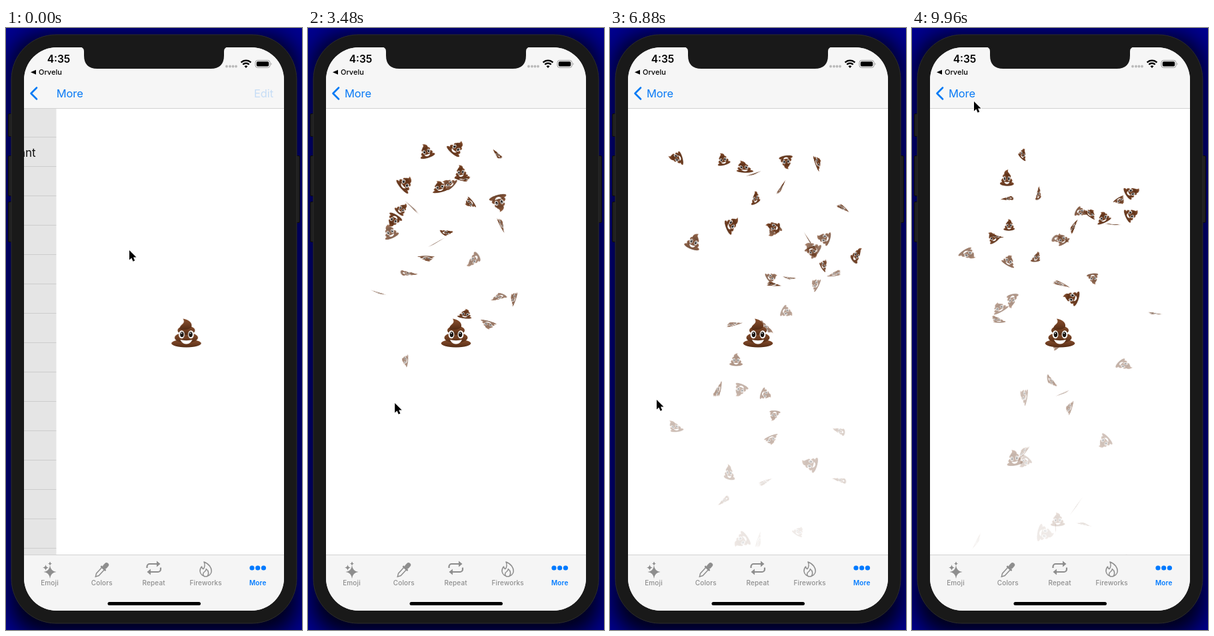
Recreate the animation shown at these times as an HTML page with a canvas. Size 444 px wide and 902 px high, loop 10 s.

```html
<!DOCTYPE html>
<html lang="en">
<head>
<meta charset="utf-8">
<title>Emoji fountain</title>
<style>
  html, body { margin: 0; width: 444px; height: 902px; overflow: hidden; background: #000090; }
  svg, canvas { position: absolute; left: 0; top: 0; display: block; }
  #stage { left: 27px; top: 121px; }
  text { font-family: Inter, Roboto, sans-serif; }
  .nav { font-size: 16.5px; letter-spacing: -.1px; fill: #087af5; }
  .tabs text { font-size: 10px; font-weight: 500; letter-spacing: .15px; text-anchor: middle; }
  .line { fill: none; stroke: #8e8e8e; }
</style>
</head>
<body>
<svg width="444" height="902" viewBox="0 0 444 902">
  <defs>
    <clipPath id="screen"><rect x="27" y="29" width="390" height="844" rx="49"/></clipPath>
    <filter id="blur" x="-20%" y="-10%" width="140%" height="120%"><feGaussianBlur stdDeviation="16"/></filter>
  </defs>
  <rect width="444" height="902" fill="#000090"/>
  <rect x="6" y="10" width="432" height="900" rx="50" opacity=".85" filter="url(#blur)"/>
  <g fill="#1f1f1f" stroke="#0b0b0b">
    <rect x="3.5" y="128.5" width="8" height="34" rx="1.5"/>
    <rect x="3.5" y="191.5" width="8" height="60" rx="1.5"/>
    <rect x="3.5" y="260.5" width="8" height="60" rx="1.5"/>
    <rect x="432.5" y="191.5" width="8" height="100" rx="1.5"/>
  </g>
  <rect x="8" y="10" width="428" height="882" rx="67" fill="#191919" stroke="#2c2c2c"/>

  <g clip-path="url(#screen)">
    <rect x="27" y="29" width="390" height="844" fill="#e5e5e5"/>
    <path id="rows" stroke="#cdcdcd"/>
    <text id="row" y="193" font-size="17" text-anchor="end" fill="#111">Elephant</text>
    <rect id="page" y="120" width="390" height="670" fill="#fff"/>
    <rect x="27" y="29" width="390" height="91" fill="#f6f6f6"/>
    <rect x="27" y="790" width="390" height="83" fill="#f5f5f5"/>
    <path d="M27 120.5H417M27 789.5H417" stroke="#d2d2d2"/>
  </g>
  <path d="M111 28.5Q117 29 117 35V41Q117 61 137 61H307Q327 61 327 41V35Q327 29 333 28.5Z" fill="#191919"/>

  <text x="79" y="52" font-size="15.5" font-weight="600" text-anchor="middle">4:35</text>
  <path d="M37 66.3L45 62.8V69.8Z"/>
  <text x="49" y="70" font-size="11" font-weight="500">Orvelu</text>
  <path d="M331 57.5h.01M336 57.5h.01M340.5 57.5h.01M345 57.5h.01" stroke="#b9b9b9" stroke-width="3.8" stroke-linecap="round"/>
  <path d="M352.6 51.6A10.5 10.5 0 0 1 367.4 51.6M355.3 54.7A6.7 6.7 0 0 1 364.7 54.7" fill="none" stroke="#000" stroke-width="2.3"/>
  <path d="M357.5 57.2Q360 55.2 362.5 57.2L360 60Z"/>
  <rect x="374" y="48.5" width="22" height="10.8" rx="3.3" fill="none" stroke="#999"/>
  <rect x="375.8" y="50.3" width="18.4" height="7.2" rx="1.8"/>
  <path d="M397.5 52Q399.5 53.9 397.5 55.8Z" fill="#999"/>

  <path d="M46 89.5L37.5 98L46 106.5" fill="none" stroke="#087af5" stroke-width="2.6" stroke-linecap="round" stroke-linejoin="round"/>
  <text id="back" class="nav" y="104">More</text>
  <text id="edit" class="nav" x="372" y="104">Edit</text>

  <g class="tabs" fill="#8e8e8e">
    <path d="M66 805Q67 814 75.500 815Q67 816 66 825Q65 816 56.500 815Q65 814 66 805M59.500 804Q60 808 64 808.500Q60 809 59.500 813Q59 809 55 808.500Q59 808 59.500 804M66 799.500Q66.500 802 69 802.500Q66.500 803 66 805.500Q65.500 803 63 802.500Q65.500 802 66 799.500"/>
    <g transform="translate(134 822.5) rotate(43)">
      <path class="line" d="M-2.5-17V-5L0-.5L2.5-5V-17" stroke-width="1.5"/>
      <rect x="-5" y="-19" width="10" height="2.8" rx="1.2"/>
      <rect x="-3.4" y="-28" width="6.8" height="10" rx="3.4"/>
    </g>
    <path class="line" d="M211.5 809V807A4 4 0 0 1 215.5 803H227M232 808.5V811A4 4 0 0 1 228 815H217" stroke-width="2.2"/>
    <path d="M226 798.5L231.5 803L226 807.5ZM217 810.5L211.5 815L217 819.5Z"/>
    <path class="line" d="M297 800C305 803 308.3 809 308.3 814A8.7 8.7 0 0 1 291 814C291 811 292 808.5 293.5 807C294 809 295 810.5 296 810.5C298.5 808 298.5 803 297 800ZM298 822C294.5 820 295 816.5 298 814.5C300 813 300.5 812 300.3 810.5C304 813 305 818.5 301.5 822" stroke-width="1.5" stroke-linejoin="round"/>
    <text x="65.5" y="835">Emoji</text>
    <text x="143.8" y="835">Colors</text>
    <text x="221.6" y="835">Repeat</text>
    <text x="299.7" y="835">Fireworks</text>
    <g fill="#007aff">
      <circle cx="369" cy="809" r="3.6"/><circle cx="377.7" cy="809" r="3.6"/><circle cx="386.4" cy="809" r="3.6"/>
      <text x="377.7" y="835" style="font-weight:600">More</text>
    </g>
  </g>
  <rect x="152.5" y="860" width="139.5" height="5" rx="2.5"/>
</svg>
<canvas id="stage" width="390" height="668"></canvas>
<svg id="cursor" width="16" height="22" viewBox="-2 -2 16 22">
  <path d="M0 0V14.5L3.3 11.5L5.6 16.7L8.2 15.6L6 10.5H10.5Z" stroke="#fff" stroke-width="1.3" paint-order="stroke"/>
</svg>
<script>
const LOOP = 10, START = 1.19, RATE = 11, LIFE = 4.1, GRAVITY = 80, RISE = .45;
const CENTER = { x: 195, y: 336 };
const $ = id => document.getElementById(id);
const ctx = $('stage').getContext('2d');
ctx.imageSmoothingQuality = 'high';

// Cursor stops: seconds, x, y
const stops = [[0, 185, 333], [.25, 185, 333], [1, 127, 562], [2.28, 127, 562], [4.56, 133, 562],
  [6, 147, 565], [6.88, 70, 557], [7.1, 70, 557], [8, 93, 110], [10, 93, 110]];

const random = (n, k) => {
  const v = Math.sin(n * 127.1 + k * 311.7 + 17) * 43758.5453;
  return v - Math.floor(v);
};

function makeSprite() {
  const sprite = document.createElement('canvas');
  sprite.width = sprite.height = 96;
  const g = sprite.getContext('2d');
  g.scale(2, 2);
  g.translate(24, 24);
  const oval = (x, y, rx, ry, fill) => {
    g.beginPath();
    g.ellipse(x, y, rx, ry, 0, 0, 7);
    g.fillStyle = fill;
    g.fill();
  };
  const shade = (top, bottom) => {
    const s = g.createLinearGradient(0, top, 0, bottom);
    s.addColorStop(0, '#88502f');
    s.addColorStop(.5, '#713f22');
    s.addColorStop(1, '#512a13');
    return s;
  };
  oval(0, 15.5, 22.3, 6, shade(9, 22));
  oval(0, 7, 17.5, 7.8, shade(-1, 15));
  oval(0, -4, 13, 6.8, shade(-11, 3));
  g.beginPath();
  g.moveTo(-10, -6);
  g.bezierCurveTo(-10, -14, 0, -13, -5, -21.5);
  g.bezierCurveTo(4, -20, 10, -15, 7.5, -8);
  g.quadraticCurveTo(0, -3, -10, -6);
  g.fillStyle = shade(-22, -4);
  g.fill();
  for (const x of [-7, 7]) {
    oval(x, 2.2, 4.4, 6, '#fff');
    oval(x * .94, 2.2, 2.8, 4.1, '#17120f');
    oval(x * .94 - .5, .4, .8, 1, '#fff');
  }
  g.beginPath();
  g.moveTo(-9, 10);
  g.quadraticCurveTo(0, 12.4, 9, 10);
  g.quadraticCurveTo(6, 16.5, 0, 16.5);
  g.quadraticCurveTo(-6, 16.5, -9, 10);
  g.fillStyle = '#fff';
  g.fill();
  return sprite;
}
const sprite = makeSprite();
const drawSprite = size => ctx.drawImage(sprite, -size / 2, -size / 2, size, size);

function drawParticle(n, age) {
  const r = k => random(n, k);
  const rise = 1 - (1 - Math.min(1, age / RISE)) ** 3;
  const dx = (r(1) + r(2) * .35 - .675) * 235 + 8;
  const dy = r(3) * 150 - 310;
  ctx.save();
  ctx.globalAlpha = Math.min(1, 1.3 * (1 - age / LIFE));
  ctx.translate(CENTER.x + dx * rise, CENTER.y + dy * rise + GRAVITY / 2 * age * age);
  // A tumble in depth, seen flat
  ctx.rotate(r(4) * 6.3 + (r(5) - .5) * 2 * age);
  ctx.scale(1, Math.cos(r(6) * 1.5 + (r(7) - .5) * 7 * age));
  ctx.rotate((r(8) - .5) * 4 * age - r(4) * 6.3 + (r(9) - .5) * 3);
  drawSprite(19 + r(10) * 10);
  ctx.restore();
}

function drawFountain(t, offset) {
  ctx.clearRect(0, 0, 390, 668);
  const first = Math.max(0, Math.ceil((t - START - LIFE) * RATE));
  const last = Math.floor((t - START) * RATE);
  const ageOf = n => t - START - n / RATE;
  const drawAll = rising => {
    for (let n = first; n <= last; n++)
      if ((ageOf(n) < RISE) === rising) drawParticle(n, ageOf(n));
  };
  drawAll(false);
  ctx.save();
  ctx.translate(CENTER.x + offset, CENTER.y);
  drawSprite(48);
  ctx.restore();
  drawAll(true);
}

function moveCursor(t) {
  const i = stops.findIndex(s => s[0] > t);
  const [t0, x0, y0] = stops[i - 1], [t1, x1, y1] = stops[i];
  const u = (t - t0) / (t1 - t0), e = u * u * (3 - 2 * u);
  $('cursor').style.transform = `translate(${x0 + (x1 - x0) * e - 2}px, ${y0 + (y1 - y0) * e - 2}px)`;
}

function slidePage(offset) {
  $('page').setAttribute('x', 27 + offset);
  $('row').setAttribute('x', 147 - (390 - offset) * .3);
  $('back').setAttribute('x', 55 + offset * 21 / 49);
  $('edit').setAttribute('opacity', offset / 49 * .2);
}

let rows = '';
for (let y = 163.5; y < 790; y += 44) rows += `M27 ${y}H417`;
$('rows').setAttribute('d', rows);

function frame() {
  const t = performance.now() / 1000 % LOOP;
  const offset = t < .45 ? 49 * Math.exp(-t / .09) : 0;
  slidePage(offset);
  drawFountain(t, offset);
  moveCursor(t);
  requestAnimationFrame(frame);
}
frame();
</script>
</body>
</html>
```
